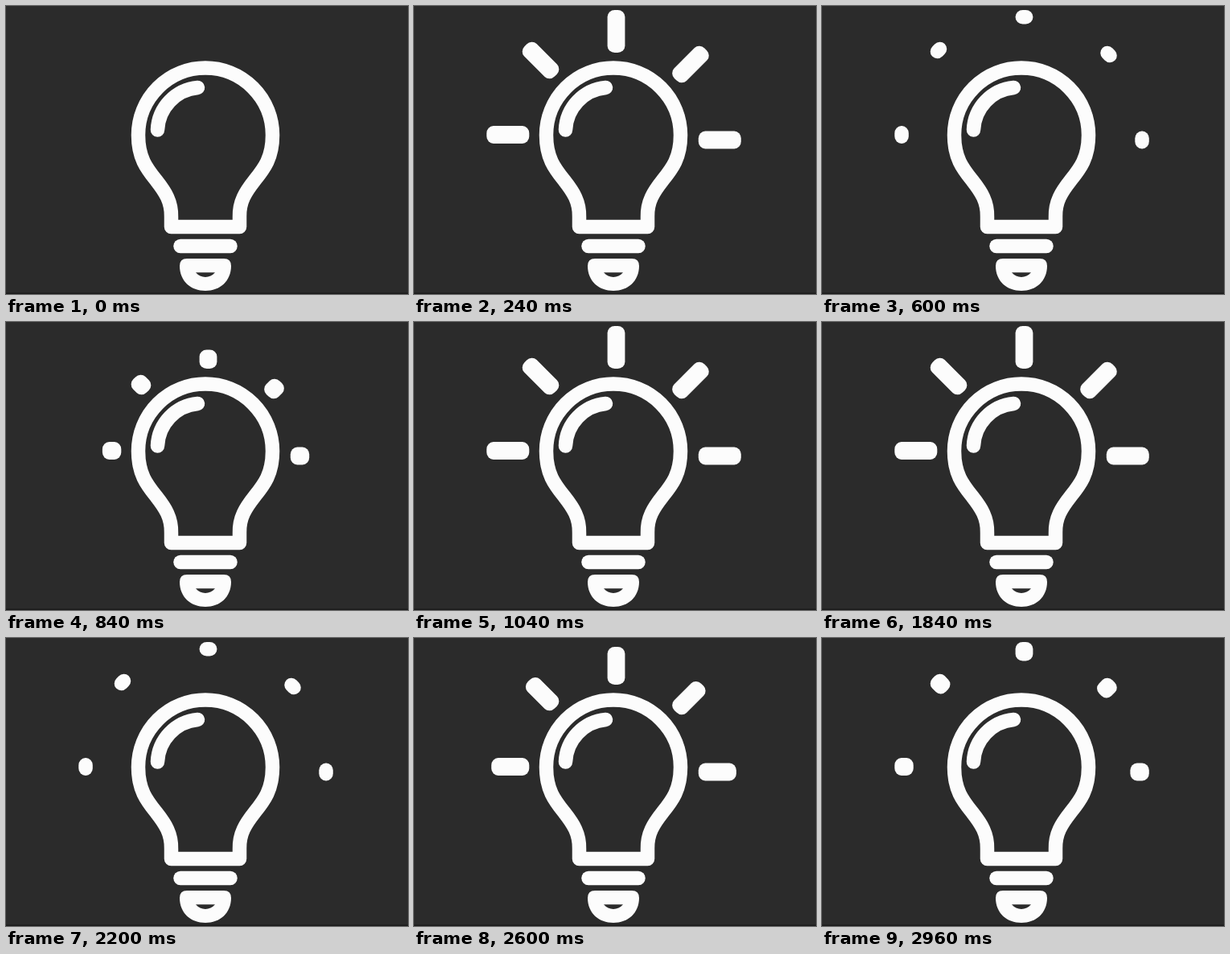
Write an HTML page that moves like this. It is 500 by 358 pixels and loops after 3 s.

```html
<!DOCTYPE html>
<html lang="en">
<head>
<meta charset="utf-8">
<title>Light bulb</title>
<style>
  html, body { margin: 0; width: 100%; height: 100%; overflow: hidden; background: #2b2b2b; }
  svg { display: block; width: 100vw; height: 100vh; }
  .line { fill: none; stroke: #fcfcfc; stroke-width: 17.5; stroke-linecap: round; stroke-linejoin: round; }
</style>
</head>
<body>
<svg viewBox="0 0 500 358">
  <rect width="500" height="358" fill="#2b2b2b"/>
  <rect y="356.5" width="500" height="1.5" fill="#1a1a1a"/>
  <path class="line" d="M205.5 274.5V262C206 243 198 231 187 217C175 202 164.5 189 164.5 160.5
    A83.5 83.5 0 0 1 331.5 160.5C331.5 189 321 202 309 217C298 231 290 243 290.5 262V274.5Z"/>
  <path class="line" d="M188.5 154A55 55 0 0 1 238.5 101.5"/>
  <path class="line" d="M217 298.5H279"/>
  <path fill="#fcfcfc" fill-rule="evenodd" d="M225 314H271Q280 314 280 323C280 342 266 354 248 354
    C230 354 216 342 216 323Q216 314 225 314ZM236 331.3H260Q255 337 248 337Q241 337 236 331.3Z"/>
  <g id="rays" fill="#fcfcfc"></g>
</svg>
<script>
  const LOOP = 3000, STEP = 40, CYCLE = 20;
  const FULL = 53, DOT = 17.5, WIDTH = 21.8;

  // Outer tip of each ray and the angle pointing inward
  const tips = [
    [90.3, 160, 0],
    [138.8, 48.8, 45],
    [251.5, 5, 90],
    [362.7, 53.8, 135],
    [406.8, 166.5, 180]
  ];

  const group = document.getElementById("rays");
  const rays = tips.map(([x, y, angle]) => {
    const ray = document.createElementNS("http://www.w3.org/2000/svg", "rect");
    ray.setAttribute("transform", `translate(${x} ${y}) rotate(${angle})`);
    ray.setAttribute("y", -WIDTH / 2);
    ray.setAttribute("height", WIDTH);
    ray.setAttribute("rx", 8.5);
    ray.setAttribute("ry", 9);
    group.appendChild(ray);
    return ray;
  });

  const clamp = v => Math.max(0, Math.min(1, v));

  function draw(time) {
    const n = Math.floor((time % LOOP) / STEP) % CYCLE;
    const grow = clamp(n / 6);
    const shrink = clamp((n - 9) / 6);
    const length = DOT + (FULL - DOT) * (grow - shrink);
    const start = n < 6 ? FULL - length : 0;
    group.setAttribute("visibility", n > 0 && n < 16 ? "visible" : "hidden");
    for (const ray of rays) {
      ray.setAttribute("x", start);
      ray.setAttribute("width", length);
    }
  }

  const begin = performance.now();
  function tick() {
    draw(performance.now() - begin);
    requestAnimationFrame(tick);
  }
  draw(0);
  requestAnimationFrame(tick);
</script>
</body>
</html>
```
